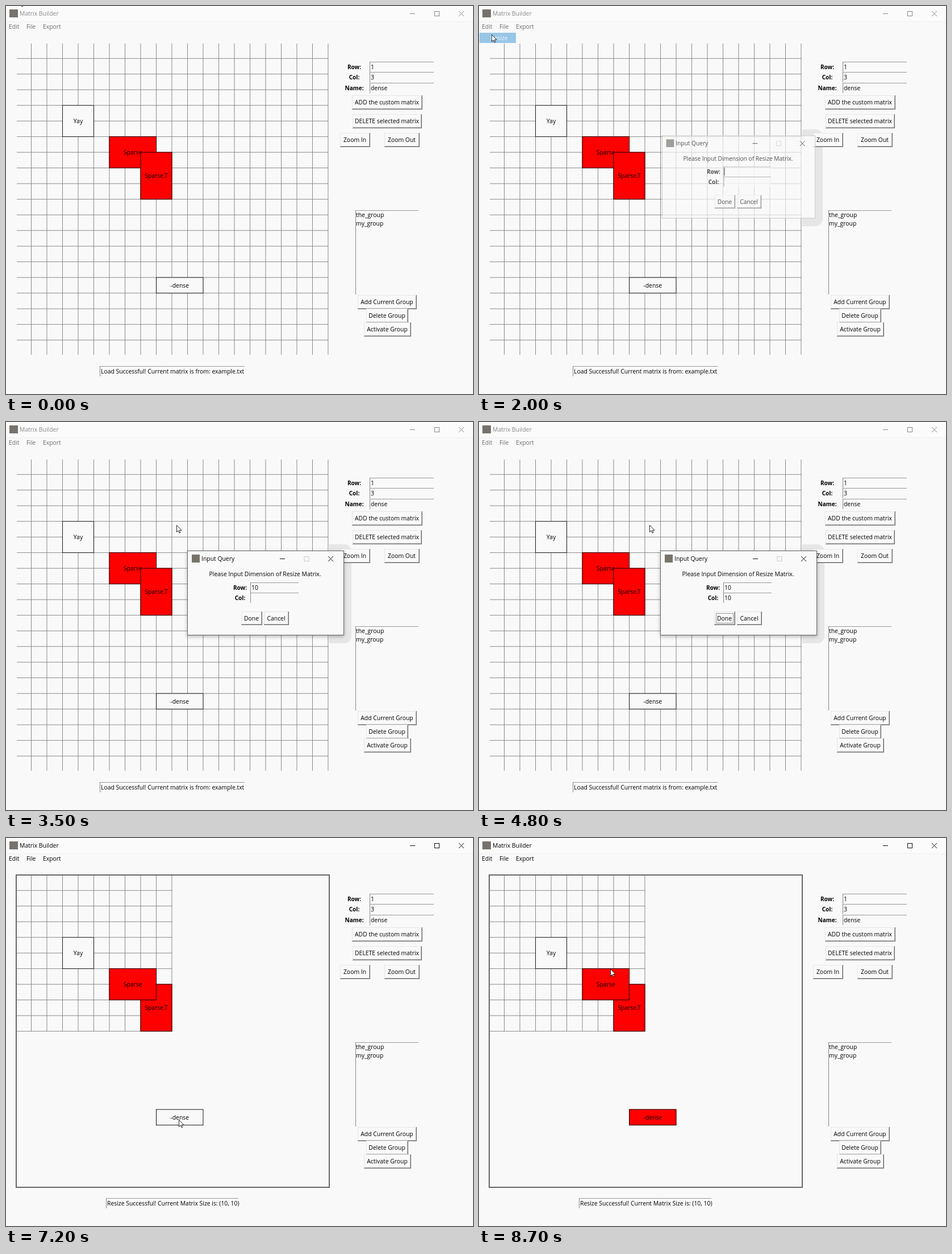
Recreate the animation shown at these times as an HTML page with a canvas. Size 822 by 682 pixels, loop 8.8 s.

```html
<!DOCTYPE html>
<html>
<head>
<meta charset="utf-8">
<style>
html, body { margin: 0; width: 100%; height: 100%; overflow: hidden; background: #f9f9f9; }
canvas { display: block; }
</style>
</head>
<body>
<canvas width="822" height="682"></canvas>
<script>
const ctx = document.querySelector('canvas').getContext('2d');
const LOOP = 8800, STEP = 100, BG = '#f9f9f9';
// Board origin, cell size and line width; the window is shown at 11/12 size
const X0 = 16.5, Y0 = 64.2, CELL = 27.5, LINE = 11 / 12;

// Pointer path: time, x, y
const PATH = [
  [100, 23, -13], [400, 36, 22], [700, 31, 43], [1000, 9, 36], [1100, 9, 36],
  [1600, 22, 50], [2000, 22, 50], [2300, 150, 120], [2700, 307, 189], [2900, 300, 181],
  [5700, 300, 181], [6100, 287, 167], [6400, 287, 167], [6600, 360, 390], [6750, 379, 525],
  [6900, 312, 515], [7000, 312, 515], [7200, 304, 495], [7400, 304, 495], [7600, 354, 455],
  [7900, 230, 290], [8200, 137, 200], [8400, 137, 201], [8700, 231, 230]
];

function pointerAt(t) {
  const i = PATH.findIndex(k => k[0] >= t);
  if (i < 1) return PATH[0].slice(1);
  const [t0, x0, y0] = PATH[i - 1], [t1, x1, y1] = PATH[i];
  const p = (t - t0) / (t1 - t0);
  return [x0 + (x1 - x0) * p, y0 + (y1 - y0) * p];
}

function rect(x, y, w, h, color) {
  ctx.fillStyle = color;
  ctx.fillRect(x, y, w, h);
}

function frame(x, y, w, h, color, line = 1) {
  ctx.strokeStyle = color;
  ctx.lineWidth = line;
  ctx.strokeRect(x + line / 2, y + line / 2, w - line, h - line);
}

function text(s, x, y, { align = 'left', color = '#000', bold = false } = {}) {
  ctx.font = (bold ? 'bold 10.1px' : '10.4px') + ' "Open Sans", "Noto Sans", sans-serif';
  ctx.textAlign = align;
  ctx.fillStyle = color;
  ctx.fillText(s, x, y + 4);
}

const centered = (s, x, y, bold) => text(s, x, y, { align: 'center', bold });

function button(s, x, y, w, h) {
  rect(x, y, w, h, BG);
  frame(x, y, w, h, '#e6e6e6');
  rect(x + w - 2, y + 1, 1, h - 2, '#aaa');
  rect(x + 1, y + h - 2, w - 2, 1, '#aaa');
  rect(x + w - 1, y, 1, h, '#707070');
  rect(x, y + h - 1, w, 1, '#707070');
  centered(s, x + w / 2 - .5, y + h / 2 - .5);
}

function sunken(x, y, w, h) {
  rect(x, y, w, h, BG);
  rect(x, y, w, 1, '#999');
  rect(x, y, 1, h, '#888');
}

function captionButtons(x, y, gap, color, maxColor) {
  rect(x, y, 9, 1, color);
  frame(x + gap, y - 4, 9, 9, maxColor);
  ctx.strokeStyle = color;
  ctx.beginPath();
  const c = x + 2 * gap;
  ctx.moveTo(c, y - 4); ctx.lineTo(c + 9, y + 5);
  ctx.moveTo(c + 9, y - 4); ctx.lineTo(c, y + 5);
  ctx.stroke();
}

function drawWindow(active, status) {
  rect(0, 0, 822, 27, '#fbfbfb');
  rect(0, 27, 822, 1, '#eee');
  rect(6, 6, 15, 14, '#77736c');
  text('Matrix Builder', 24, 13, { color: active ? '#000' : '#888' });
  const tone = active ? '#111' : '#888';
  captionButtons(711, 13, 43, tone, tone);
  const menu = { color: active ? '#000' : '#6d6d6d' };
  text('Edit', 5, 36, menu);
  text('File', 36, 36, menu);
  text('Export', 65, 36, menu);

  [['Row:', '1'], ['Col:', '3'], ['Name:', 'dense']].forEach(([label, value], i) => {
    const y = Math.round(107 + 18.4 * i);
    centered(label, 613, y, true);
    sunken(640, y - 9, 113, 18);
    text(value, 642, y);
  });
  button('ADD the custom matrix', 609, 157, 124, 25);
  button('DELETE selected matrix', 610, 190, 122, 25);
  button('Zoom In', 588, 223, 53, 25);
  button('Zoom Out', 666, 223, 62, 25);
  sunken(615, 359, 111, 148);
  text('the_group', 616, 367);
  text('my_group', 616, 382);
  button('Add Current Group', 619, 508, 104, 25);
  button('Delete Group', 634, 532, 74, 25);
  button('Activate Group', 630, 556, 83, 25);

  const x = status.startsWith('Load') ? 165 : 176;
  sunken(x, 633, 2 * (292.5 - x), 18);
  text(status, x + 2, 642);
}

function block(name, col, row, w, h, fill) {
  const x = X0 + col * CELL, y = Y0 + row * CELL;
  const width = w * CELL + LINE, height = h * CELL + LINE;
  rect(x, y, width, height, fill);
  frame(x, y, width, height, '#000', LINE);
  centered(name, x + width / 2, Math.round(y + height / 2));
}

function drawBoard(t, active, resized) {
  const n = resized ? 10 : 20, size = n * CELL;
  const right = Math.min(X0 + size + LINE, 568), bottom = Math.min(Y0 + size + LINE, 613);
  for (let i = 1; i <= n; i++) {
    rect(X0 + i * CELL, 66, LINE, bottom - 66, '#808080');
    if (i < 20) rect(19, Y0 + i * CELL, right - 19, LINE, '#808080');
  }
  if (active) frame(17, 64, 553, 551, '#666', 2);
  block('Yay', 3, 4, 2, 2, t >= 8300 && t < 8500 ? '#f00' : BG);
  const sparse = () => block('Sparse', 6, 6, 3, 2, '#f00');
  if (!resized) sparse();
  block('Sparse.T', 8, 7, 2, 3, '#f00');
  if (resized) sparse();
  block('-dense', 9, 15, 3, 1, t >= 7400 ? '#f00' : BG);
}

function drawMenu(t) {
  if (t >= 1100 && t < 1900) {
    rect(0, 27, 30, 18, '#c5e6f5');
    text('Edit', 5, 36);
    ctx.globalAlpha = t < 1200 ? .55 : 1;
    rect(4, 49, 66, 37, '#aaa');
    rect(0, 45, 67, 39, '#f2f2f2');
    frame(0, 45, 67, 39, '#bbb');
    if (t >= 1500) rect(1, 47, 64, 18, '#91c9f7');
    text('Resize', 20, 56, { color: '#333' });
    text('Reset', 20, 73, { color: '#333' });
  } else if (t >= 1900 && t < 2100) {
    rect(1, 47, 64, 18, '#98c6e6');
    text('Resize', 20, 56, { color: '#eef6fc' });
  }
  ctx.globalAlpha = 1;
}

// Scale and opacity of the dialog while it opens and closes
function dialogState(t) {
  if (t < 2000 || t >= 5400) return null;
  if (t < 2100) return { scale: .98, alpha: .68 };
  if (t < 5200) return { scale: 1, alpha: 1 };
  return t < 5300 ? { scale: .98, alpha: .6 } : { scale: .955, alpha: .1 };
}

function scaled(scale, draw) {
  ctx.save();
  ctx.translate(456, 300);
  ctx.scale(scale, scale);
  ctx.translate(-456, -300);
  draw();
  ctx.restore();
}

function drawShadow(scale) {
  ctx.save();
  ctx.beginPath();
  ctx.rect(569, 0, 253, 682);
  ctx.clip();
  scaled(scale, () => {
    ctx.fillStyle = '#e6e6e6';
    ctx.beginPath();
    ctx.roundRect(304, 215, 304, 174, 13);
    ctx.fill();
    rect(319, 226, 276, 149, BG);
  });
  ctx.restore();
}

function drawDialog(t, { scale, alpha }) {
  ctx.globalAlpha = alpha;
  scaled(scale, () => {
    // A cast shadow would show through the half-open dialog
    if (alpha === 1) {
      ctx.shadowColor = 'rgba(0,0,0,.3)';
      ctx.shadowBlur = 6;
      ctx.shadowOffsetY = 2;
    }
    rect(319, 226, 276, 149, BG);
    ctx.shadowColor = 'transparent';
    frame(319, 226, 276, 149, alpha === 1 ? '#666' : '#aaa');
    rect(327, 233, 14, 14, '#77736c');
    text('Input Query', 344, 240);
    captionButtons(482, 240, 42.5, '#111', '#ccc');
    centered('Please Input Dimension of Resize Matrix.', 456, 267);
    centered('Row:', 412, 291, true);
    centered('Col:', 412, 309, true);
    sunken(430, 282, 85, 18);
    sunken(430, 300, 85, 18);
    const typed = (first, second) => '10'.slice(0, (t >= first) + (t >= second));
    text(typed(3300, 3500), 432, 291);
    text(typed(4200, 4500), 432, 309);
    const caret = (x, y) => rect(x, y, 1, 14, '#000');
    if (t < 2300 || (t >= 2600 && t < 2900)) caret(431, 284);
    if (t === 3800) caret(443, 284);
    if (t >= 3900 && t < 4200) caret(431, 302);
    button('Done', 414, 333, 37, 24);
    button('Cancel', 454, 333, 44, 24);
    if (t >= 4800) {
      ctx.setLineDash([1, 1]);
      frame(417, 336, 31, 18, '#333');
    }
  });
  ctx.globalAlpha = 1;
}

const ARROW = new Path2D('M0 0V12L2.8 9.4 4.6 13.6 6.4 12.8 4.7 8.8H8.5Z');

function drawPointer(t) {
  const [x, y] = pointerAt(t);
  ctx.save();
  ctx.translate(x + .5, y + .5);
  ctx.fillStyle = '#fff';
  ctx.strokeStyle = '#111';
  ctx.lineWidth = .9;
  ctx.fill(ARROW);
  ctx.stroke(ARROW);
  ctx.restore();
}

function draw(now) {
  const t = Math.floor(now % LOOP / STEP) * STEP;
  const active = (t >= 1100 && t < 2000) || t >= 5200;
  const resized = t >= 5100;
  const dialog = dialogState(t);
  rect(0, 0, 822, 682, BG);
  if (dialog) drawShadow(dialog.scale);
  drawWindow(active, resized
    ? 'Resize Successful! Current Matrix Size is: (10, 10)'
    : 'Load Successful! Current matrix is from: example.txt');
  drawBoard(t, active, resized);
  drawMenu(t);
  if (dialog) drawDialog(t, dialog);
  drawPointer(t);
}

const start = performance.now();
function tick() {
  draw(performance.now() - start);
  requestAnimationFrame(tick);
}
tick();
</script>
</body>
</html>
```
